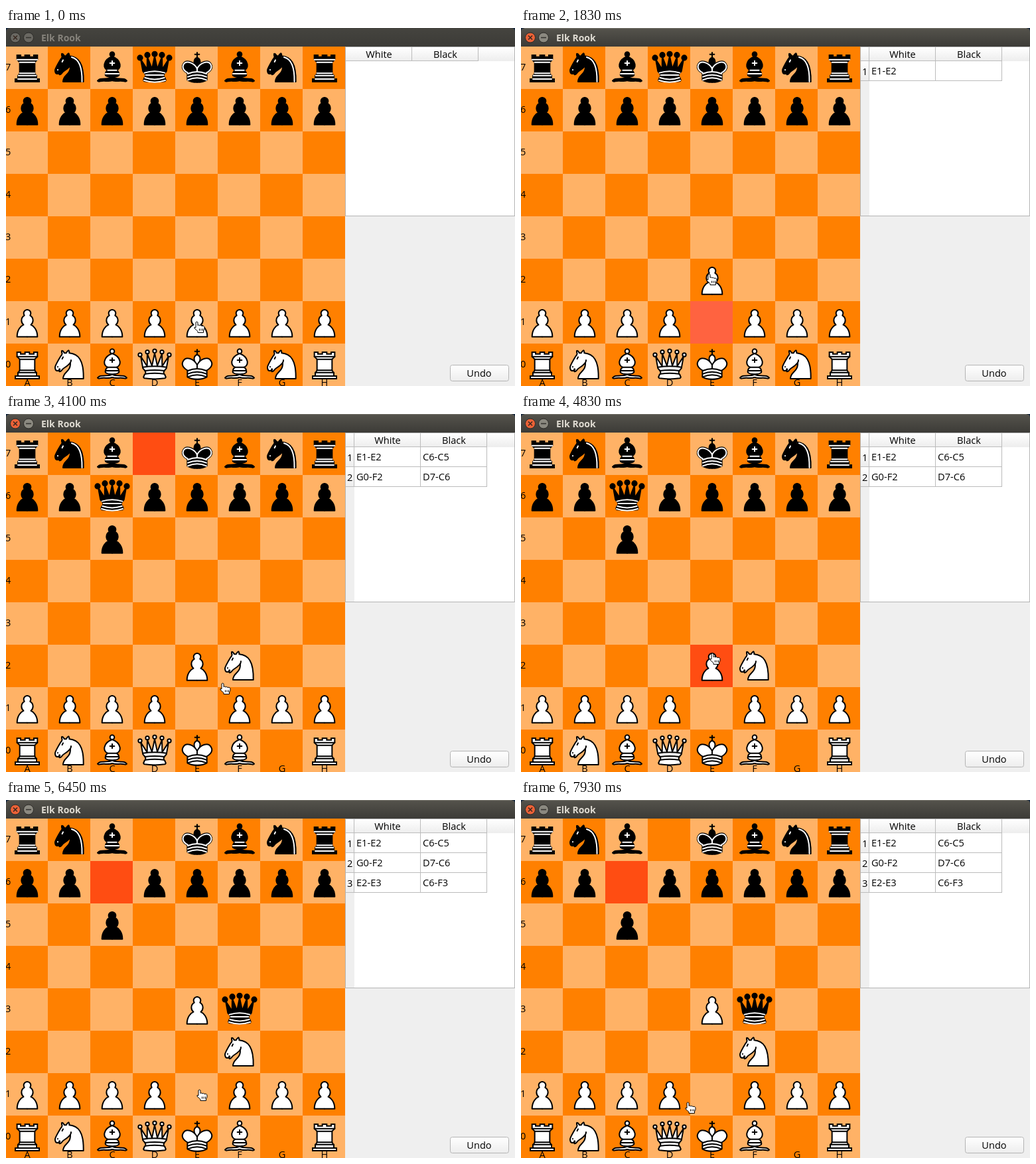
An HTML page for the animation above (8000 ms loop, 767x540 px).

```html
<!DOCTYPE html>
<html lang="en">
<head>
<meta charset="utf-8">
<title>Elk Rook</title>
<style>
  html, body { margin: 0; width: 100%; height: 100%; overflow: hidden; background: #efefef; }
  svg { display: block; }
  text { font: 14.6px "Open Sans", "Noto Sans", sans-serif; fill: #000; }
  .mid { text-anchor: middle; }
  #name { font-size: 14px; font-weight: 700; }
  .piece { stroke: #000; stroke-width: 1.5; stroke-linecap: round; stroke-linejoin: round; }
  .rule { fill: none; stroke: #bcbcbc; }
</style>
</head>
<body>
<svg id="stage" width="767" height="540" viewBox="0 0 767 540">
  <defs>
    <linearGradient id="bar" x2="0" y2="1"><stop stop-color="#55534c"/><stop offset="1" stop-color="#3c3b37"/></linearGradient>
    <linearGradient id="barOff" x2="0" y2="1"><stop stop-color="#45443f"/><stop offset="1" stop-color="#3c3b37"/></linearGradient>
    <linearGradient id="soft" x2="0" y2="1"><stop stop-color="#fff"/><stop offset="1" stop-color="#ededed"/></linearGradient>
  </defs>
  <rect width="767" height="540" fill="#efefef"/>
  <g id="board"></g>
  <g id="pieces"></g>
  <g id="labels"></g>

  <rect x="511.5" y="28.5" width="255" height="255" fill="#fff" stroke="#b4b4b4"/>
  <rect x="512" y="29" width="254" height="21" fill="url(#soft)"/>
  <g id="rowHead">
    <rect x="512" y="50" width="13" height="233" fill="#efefef"/>
    <path class="rule" d="M512 49.5h13M524.5 29v21"/>
  </g>
  <g id="head">
    <path class="rule" d="M512 49.5h200M611.5 29v21M711.5 29v21"/>
    <text class="mid" x="562" y="45">White</text>
    <text class="mid" x="662" y="45">Black</text>
  </g>
  <g id="rows"></g>
  <rect x="669.5" y="508.5" width="88" height="24" rx="3" fill="url(#soft)" stroke="#b4b4b4"/>
  <text class="mid" x="713" y="526">Undo</text>

  <rect width="767" height="28" fill="#10243c"/>
  <path id="barFill" d="M0 28V6Q0 0 6 0H761Q767 0 767 6V28Z"/>
  <path id="shine" d="M5 .5H762" stroke="#77756d"/>
  <circle id="close" cx="14" cy="14.5" r="7.5" stroke="#2b2a27"/>
  <path d="M11 11.5l6 6m0-6l-6 6" stroke="#3a2a22" stroke-width="1.6"/>
  <circle id="min" cx="34" cy="14.5" r="7.5" stroke="#2b2a27"/>
  <path d="M30 14.5h8" stroke="#35342f" stroke-width="1.6"/>
  <text id="name" x="53" y="20">Elk Rook</text>

  <g id="hand" fill="#fff" stroke="#000" stroke-linejoin="round">
    <path d="M3 2Q4.5 0 6 2V6.5Q7.5 5 9 7 10.5 5.5 12 7.5 16 6.5 16 10V12L14.5 15V17.5H6V15.5L1 11Q0 8.5 3 9.8Z"/>
    <path d="M8.5 11.5v3m2.5-3v3m2.5-3v3" fill="none"/>
  </g>
</svg>

<script>
const LOOP = 8000;
const MID = 22.5; // axis of a piece, drawn on a 45-unit square
const $ = id => document.getElementById(id);
const add = (id, html) => { $(id).insertAdjacentHTML('beforeend', html); return $(id).lastElementChild; };
const show = (el, on) => el.setAttribute('visibility', on ? 'visible' : 'hidden');

const path = (d, attrs = '') => `<path d="${d}" ${attrs}/>`;
const dot = (x, y, r, attrs = '') => `<circle cx="${x}" cy="${y}" r="${r}" ${attrs}/>`;
const mirror = (d, attrs) => path(d, attrs) + `<g transform="translate(45) scale(-1 1)">${path(d, attrs)}</g>`;
const line = (d, dark) => path(d, `fill="none" stroke="${dark ? '#fff' : '#000'}"`);
// Horizontal line across the axis, bent by "bow" in its middle
const arc = (y, half, bow = 0) => `M${MID - half} ${y}Q${MID} ${y + 2 * bow} ${MID + half} ${y}`;

const shapes = {
  P: () => mirror('M22.5 9c-2.2 0-4 1.8-4 4 0 .9.3 1.7.8 2.4C17.3 16.5 16 18.6 16 21c0 2 .9 3.8 2.4 5-3 1.1-7.4 5.6-7.4 13.5H22.5'),

  R: dark => mirror('M22.5 39H9V36H12V32H12.5L14 29.5V17L11 14V9H15V11H20V9H22.5', 'stroke-linejoin="miter"')
    + line(arc(36, 10.5) + arc(32, 10) + arc(29.5, 8.5) + arc(17, 8.5) + arc(14, 11.5), dark),

  N: dark => path('M22 10C32.5 11 38.5 18 38 39H15C15 30 25 32.5 23 18')
    + path('M24 18C24.4 21 18.5 25.4 16 27 13 29 13.2 31.3 11 31 10 30 12.4 28 11 28 10 28 11.2 29.2 10 30 9 30 6 31 6 26 6 24 12 14 12 14S13.9 12 14 10.5C13.3 9.5 13.5 7.5 13.5 7.5 14.5 6.5 16.5 10 16.5 10H18.5S19.3 8 21 7C22 7 22 10 22 10')
    + line('M9 25.5v.1M15 14.5l-1 2', dark)
    + (dark ? line('M24.7 11.2C32 13 36.8 20 36.4 39', dark) : ''),

  B: dark => mirror('M22.5 34C19 36.4 12.4 35 9 36 9 36 7.4 36.5 6 38 6.7 39 7.6 39 9 38.5 12.4 37.5 19 39 22.5 37.5')
    + mirror('M22.5 33.9C19.5 33.9 16.2 33.2 15 32 14.5 30.5 15 30 15 30 15 27.5 17.5 26 17.5 26 12 24.5 11.5 14.5 22.5 10.5')
    + dot(MID, 8, 2.5)
    + line(arc(26, 5) + arc(30, 7.5) + arc(18, 2.5) + 'M22.5 15.5v5', dark),

  Q: dark => [-2, -1, 0, 1, 2].map(k => dot(MID + 8.25 * k, 7.7 + 1.07 * k * k, dark ? 2.7 : 2)).join('')
    + mirror('M22.5 10L19.5 24.5 14.2 10.8 14 25 6.8 13.7 9 26C9 28 10.5 28 11.5 30 12.5 31.5 12.5 31 12 33.5 10.5 34.5 10.5 36 10.5 36 9 37.5 11 38.5 11 38.5 14.3 39 18.4 39.3 22.5 39.3')
    + line(dark
      ? arc(29, 11.5, -1.9) + arc(31.5, 10) + arc(34.5, 11, 1.8) + arc(37.5, 12, 2)
      : arc(26, 13.5, -1.1) + arc(30, 11, -.75) + arc(33.5, 10.5, -.75), dark),

  K: dark => line('M22.5 11.6V6M20 8h5')
    + mirror('M22.5 25S18 17.5 19.5 14.5C19.5 14.5 20.5 12 22.5 12')
    + mirror('M22.5 27V23.5C19 16 9.5 13 6.5 19.5 3.5 25.5 11.5 29.5 11.5 29.5V37C14.2 38.7 18.4 39.6 22.5 39.6')
    + (dark ? mirror('M22.5 26.6V24.5C20 18 10 14 7 19.8 4.5 25.5 11.8 28.8 11.8 28.8', 'fill="none" stroke="#fff"') : '')
    + line([30, 33.5, 37].map(y => arc(y, 10.5, -2.25)).join(''), dark)
};

// Pick-up time, drop time, from, to; white and black alternate
const moves = [
  [1100, 1650, 'E1', 'E2'], [2030, 2030, 'C6', 'C5'],
  [3130, 3450, 'G0', 'F2'], [3850, 3850, 'D7', 'C6'],
  [4730, 5040, 'E2', 'E3'], [5700, 5700, 'C6', 'F3']
];

// Pointer glides: start, end, x, y; it rests in between
const glides = [
  [1100, 1430, 279, 370], [2300, 2420, 261, 400], [2420, 2790, 471, 522], [2790, 2980, 393, 491],
  [3130, 3580, 336, 388], [3850, 4100, 322, 405], [4100, 4600, 283, 378], [4730, 5100, 285, 312],
  [5380, 5600, 291, 378], [5600, 6180, 288, 423], [6250, 6450, 287, 436], [6450, 7030, 203, 469],
  [7080, 7300, 347, 498], [7480, 7930, 247, 455]
];

const files = 'ABCDEFGH';
const cellX = c => 64 * c - 1;
const cellY = r => 476 - 64 * r;
const spot = sq => [files.indexOf(sq[0]), +sq[1]];
const isDark = (c, r) => (c + r) % 2 === 0;

const pieces = [];
function addPiece(kind, dark, sq) {
  const el = add('pieces', `<g class="piece" fill="${dark ? '#000' : '#fff'}">${shapes[kind](dark)}</g>`);
  pieces.push({ el, sq });
}

for (let r = 0; r < 8; r++) {
  for (let c = 0; c < 8; c++) {
    add('board', `<rect x="${cellX(c)}" y="${cellY(r)}" width="64" height="64" fill="${isDark(c, r) ? '#ff8000' : '#ffb266'}"/>`);
  }
  add('labels', `<text x="-1" y="${cellY(r) + 36}">${r}</text><text class="mid" x="${32 + 64 * r}" y="540">${files[r]}</text>`);
}
const mark = add('board', '<rect width="64" height="64"/>');
[...'RNBQKBNR'].forEach((kind, c) => {
  addPiece(kind, false, files[c] + 0);
  addPiece('P', false, files[c] + 1);
  addPiece('P', true, files[c] + 6);
  addPiece(kind, true, files[c] + 7);
});

const entries = moves.map(([, at, from, to], i) => {
  const n = i >> 1, y = 50 + 30 * n, black = i % 2;
  const grid = black ? '' : `<rect x="512" y="${y}" width="12" height="29" fill="url(#soft)"/>`
    + `<path class="rule" d="M512 ${y + 29.5}H725M524.5 ${y}v30M624.5 ${y}v30M724.5 ${y}v30"/>`
    + `<text x="514" y="${y + 21}">${n + 1}</text>`;
  return { at, el: add('rows', `<g>${grid}<text x="${black ? 628 : 528}" y="${y + 20}">${from}-${to}</text></g>`) };
});

function pointer(t) {
  let x = 283, y = 442;
  for (const [from, to, gx, gy] of glides) {
    const k = Math.min(1, Math.max(0, (t - from) / (to - from)));
    x += (gx - x) * k;
    y += (gy - y) * k;
  }
  return `${Math.round(x)} ${Math.round(y)}`;
}

function render(t) {
  for (const { el, sq } of pieces) {
    const now = moves.reduce((s, [, at, from, to]) => t >= at && s === from ? to : s, sq);
    const [c, r] = spot(now);
    el.setAttribute('transform', `translate(${cellX(c) + 3} ${cellY(r) + 1}) scale(${4 / 3})`);
  }

  const last = moves.filter(m => t >= m[0]).pop();
  show(mark, last);
  if (last) {
    const [c, r] = spot(last[2]);
    mark.setAttribute('x', cellX(c));
    mark.setAttribute('y', cellY(r));
    mark.setAttribute('fill', isDark(c, r) ? '#ff4d12' : '#ff6340');
  }

  entries.forEach(e => show(e.el, t >= e.at));
  const started = t >= moves[0][1];
  show($('rowHead'), started);
  $('head').setAttribute('transform', `translate(${started ? 13 : 0} 0)`);

  const active = t >= moves[0][0];
  $('barFill').setAttribute('fill', active ? 'url(#bar)' : 'url(#barOff)');
  show($('shine'), active);
  $('close').setAttribute('fill', active ? '#ec6237' : '#6a6862');
  $('min').setAttribute('fill', active ? '#8b8980' : '#6a6862');
  $('name').style.fill = active ? '#dfdbd2' : '#85827b';

  $('hand').setAttribute('transform', `translate(${pointer(t)})`);
}

const start = performance.now();
function frame() {
  render((performance.now() - start) % LOOP);
  requestAnimationFrame(frame);
}
render(0);
requestAnimationFrame(frame);
</script>
</body>
</html>
```
